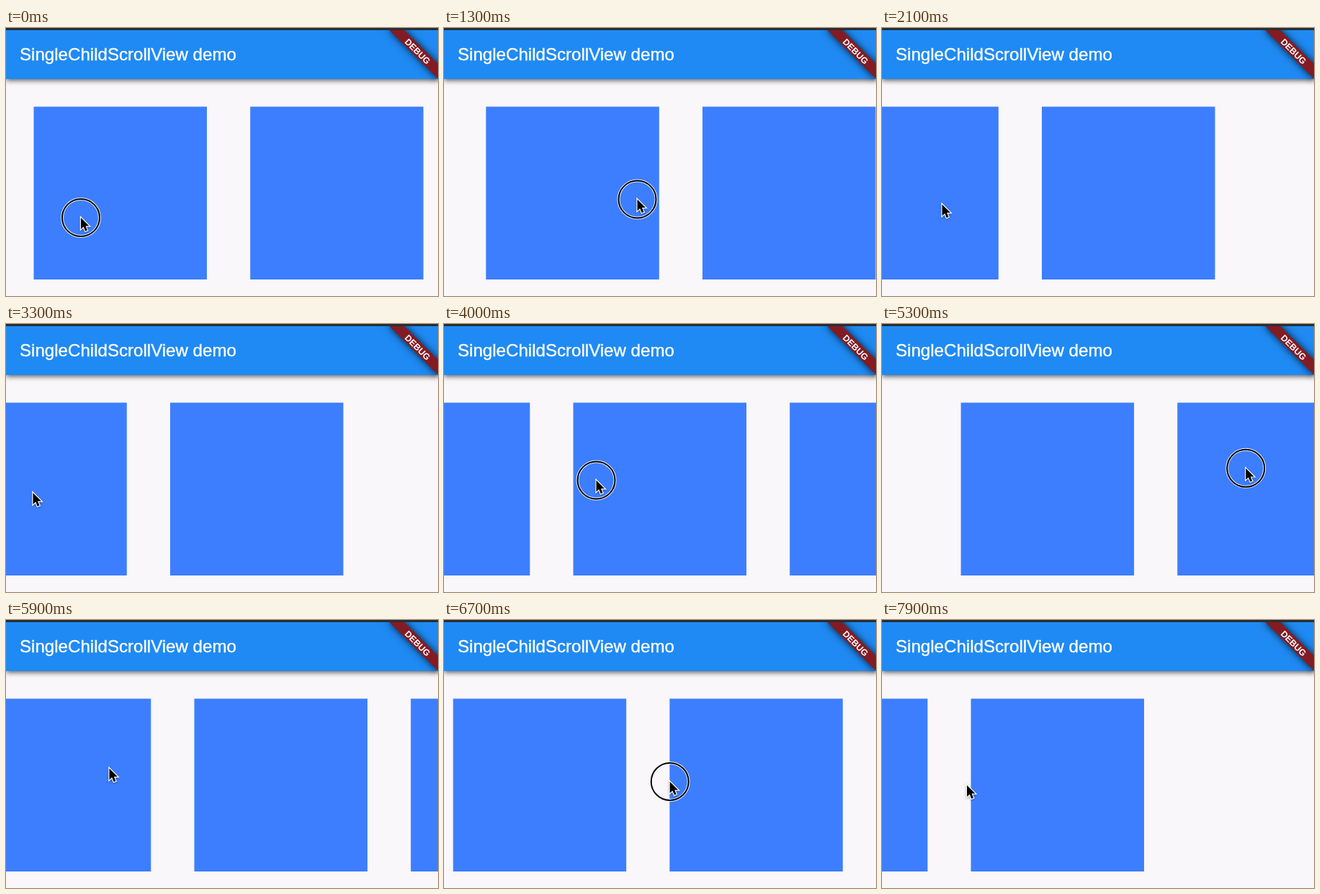
Recreate the animation shown at these times as an HTML page with a canvas. Size 600 by 373 pixels, loop 8000 ms.

```html
<!DOCTYPE html>
<html lang="en">
<head>
<meta charset="utf-8">
<title>Scroll view demo</title>
<style>
  html, body { margin: 0; width: 100%; height: 100%; overflow: hidden; background: #f9f7fa; }
  canvas { display: block; width: 600px; height: 373px; }
</style>
</head>
<body>
<canvas id="stage" width="600" height="373"></canvas>
<script>
const ctx = document.getElementById("stage").getContext("2d");
const W = 600, H = 373, LOOP = 8000, STEP = 100;
const COUNT = 5, PITCH = 300.7, SIZE = 240.5, TOP = 109.5;
const RUBBER = 0.5;
const FONT = '"Liberation Sans", Arial, sans-serif';

const easeIn = u => u ** 3;
const easeOut = u => 1 - (1 - u) ** 3;
const easeBoth = u => u ** 3 * (10 - 15 * u + 6 * u * u);

// Each stroke runs until the next one. "reach" is how far the pointer swings
// out and back on the way; "hold" is the pressed part of the stroke.
const STROKES = [
  { at: 0, x: 104, y: 264, box: 38.5, reach: 200, hold: [0, 1], ease: easeBoth },
  { at: 1300, x: 268.5, y: 238.5, box: 58.3, reach: 0, hold: [0, 0.45], ease: easeBoth },
  { at: 2100, x: 83.5, y: 245.5, box: -980.8, reach: 190, hold: [0.35, 0.9], ease: easeBoth },
  { at: 3300, x: 37.5, y: 235, box: -974.8, reach: 0, hold: [0.25, 1], ease: easeBoth },
  { at: 4700, x: 385.5, y: 200, box: 131, reach: 150, hold: [0, 0.85], ease: easeIn },
  { at: 5900, x: 143.5, y: 206.5, box: -640.6, reach: 200, hold: [0.4, 0.95], ease: easeOut },
  { at: 7900, x: 118, y: 230, box: -1079.3 }
];

function pose(t) {
  const i = Math.max(1, STROKES.findIndex((s, n) => n > 0 && (t < s.at || n === STROKES.length - 1)));
  const a = STROKES[i - 1], b = STROKES[i];
  const u = Math.min(1, (t - a.at) / (b.at - a.at));
  const k = a.ease(u), swing = a.reach * Math.sin(Math.PI * u);
  const mix = name => a[name] + (b[name] - a[name]) * k;
  return {
    x: mix("x") + swing,
    y: mix("y"),
    box: mix("box") + swing * RUBBER,
    held: u >= a.hold[0] && u < a.hold[1]
  };
}

function setShadow(color, blur, y) {
  ctx.shadowColor = color;
  ctx.shadowBlur = blur;
  ctx.shadowOffsetY = y;
}

function drawBoxes(x) {
  ctx.fillStyle = "#3d7eff";
  for (let i = 0; i < COUNT; i++) ctx.fillRect(x + i * PITCH, TOP, SIZE, SIZE);
}

function drawBar() {
  ctx.save();
  setShadow("rgba(0,0,0,.65)", 7, 2);
  ctx.fillStyle = "#1f8af3";
  ctx.fillRect(0, 0, W, 71);
  ctx.restore();
  ctx.fillStyle = ctx.strokeStyle = "#fff";
  ctx.lineWidth = 0.4;
  ctx.font = "24.1px " + FONT;
  ctx.textAlign = "left";
  ctx.fillText("SingleChildScrollView demo", 19, 45);
  ctx.strokeText("SingleChildScrollView demo", 19, 45);
}

function drawBanner() {
  ctx.save();
  ctx.translate(600.5, 3);
  ctx.rotate(Math.PI / 4);
  setShadow("rgba(0,0,0,.85)", 11, 0);
  ctx.fillStyle = "#851b22";
  ctx.fillRect(-48, 33.6, 96, 14.4);
  setShadow("transparent", 0, 0);
  ctx.fillStyle = "#fff";
  ctx.font = "bold 12.2px " + FONT;
  ctx.textAlign = "center";
  ctx.fillText("DEBUG", 0.4, 45.6);
  ctx.restore();
}

function drawRing(x, y) {
  ctx.beginPath();
  ctx.arc(x, y, 26, 0, 2 * Math.PI);
  ctx.strokeStyle = "rgba(255,255,255,.85)";
  ctx.lineWidth = 4;
  ctx.stroke();
  ctx.strokeStyle = "#000";
  ctx.lineWidth = 2;
  ctx.stroke();
}

const ARROW = new Path2D("M0 0V16L3.7 12.6L6.2 18.7L9 17.5L6.5 11.6H11.5Z");

function drawPointer(x, y) {
  ctx.save();
  ctx.translate(x, y);
  ctx.strokeStyle = "#fff";
  ctx.lineWidth = 2.4;
  setShadow("rgba(0,0,0,.35)", 3, 1);
  ctx.stroke(ARROW);
  setShadow("transparent", 0, 0);
  ctx.fillStyle = "#000";
  ctx.fill(ARROW);
  ctx.restore();
}

function draw(t) {
  const p = pose(t);
  ctx.fillStyle = "#f9f7fa";
  ctx.fillRect(0, 0, W, H);
  drawBoxes(p.box);
  drawBar();
  drawBanner();
  ctx.fillStyle = "#2b2c31";
  ctx.fillRect(0, 0, W, 3);
  if (p.held) drawRing(p.x, p.y);
  drawPointer(p.x, p.y);
}

let start;
function tick(now) {
  if (start === undefined) start = now;
  const t = (now - start) % LOOP;
  draw(Math.floor(t / STEP) * STEP);
  requestAnimationFrame(tick);
}
draw(0);
requestAnimationFrame(tick);
</script>
</body>
</html>
```
